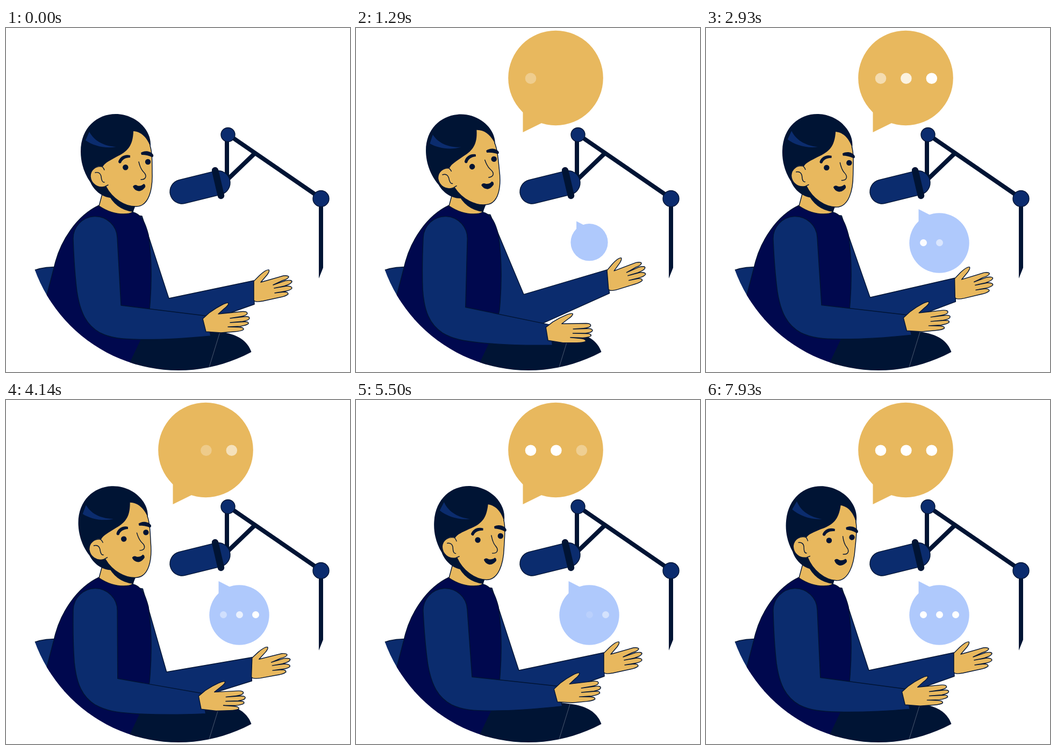
These frames come from a looping animation (640x640 px, 8000 ms). An HTML page:

```html
<!DOCTYPE html>
<html lang="en">
<head>
<meta charset="utf-8">
<title>Podcast talk</title>
<style>
  html, body { margin: 0; height: 100%; overflow: hidden; background: #fff; }
  svg { display: block; width: 100vw; height: 100vh; }
  .dark { fill: #001434; }
  .blue { fill: #0b2c6e; }
  .navy { fill: #00084e; }
  .skin { fill: #e8b85e; }
  .pale { fill: #afc9fc; }
  .edge { stroke: #001434; stroke-width: 1.4; stroke-linejoin: round; }
  .line { fill: none; stroke: #001434; stroke-width: 1.4; stroke-linecap: round; }
  .bar { fill: none; stroke: #001434; stroke-width: 8; }
</style>
</head>
<body>
<svg viewBox="0 0 640 640">
  <defs>
    <clipPath id="disc"><circle cx="321" cy="352.4" r="284.6"/></clipPath>
  </defs>

  <g clip-path="url(#disc)">
    <path class="blue edge" d="M40 456Q66 443 95 445L80 510L60 510Z"/>
  </g>

  <g id="farArm">
    <path class="blue edge" d="M215 345L253 350L303 503L461 470L462 514L335 559L255 560Z"/>
    <path class="skin edge" d="M461 471L472 460Q484 449 489 450Q491 452 486 459L474 473L516 461Q525 460 526 463Q525 467 514 470L497 478L520 470Q532 468 532 472Q531 476 518 480L499 484L522 480Q532 480 532 484Q530 488 518 490L500 493L517 491Q525 491 525 495Q521 499 510 501L478 508Q462 511 461 506Z"/>
  </g>

  <g clip-path="url(#disc)">
    <path class="navy edge" d="M173 330C130 350 102 398 92 435L70 520L100 640H240L267 525C272 470 271 425 265 385C260 365 253 347 237 343Z"/>
    <path class="dark" d="M249 583L260 562L380 563L399 565.5C430 569 450 582 457 604V640H222Z"/>
    <path d="M398 566L377 634" stroke="#6b7488" stroke-width=".7"/>
  </g>

  <path class="skin edge" d="M180 305L173 331Q195 346 219 346Q231 346 236 342L242 320Z"/>
  <path class="dark" d="M188 305Q203 338 236 342L242 328L220 305Z"/>

  <g id="head">
    <path class="dark" d="M196 316C178 315 163 301 157 287C145 270 139 250 139 230C139 185 170 160 204 160C240 160 269 188 269 216V228L190 270Z"/>
    <path class="skin" d="M237 192C252 193 262 204 268 219C272 230 272 250 272 270C273 300 266 331 243 332C222 333 198 318 186 295C170 299 158 289 157 276C157 263 170 254 180 258C184 251 191 248 205 240C226 230 236 220 237 192Z"/>
    <path class="line" d="M268 219C272 230 272 250 272 270C273 300 266 331 243 332C222 333 198 318 186 295M190 292L184 295C170 299 158 289 157 276C157 263 168 256 179 258Q182 261 183 264M166 269Q175 267 177 276Q178 288 183 287M247 249Q250 262 256 268Q262 274 259 279Q257 282 251 282"/>
    <path class="blue" d="M148 209L155 193C165 212 185 220 205 221C185 225 162 219 148 209Z"/>
    <path class="dark" d="M209 249C211 240 221 234 231 237V241C222 241 216 245 214 251Q210 253 209 249ZM251 232C259 227 270 229 274 236Q275 241 271 240C265 237 258 236 252 236Z"/>
    <circle class="dark" cx="222.3" cy="259.3" r="5.2"/>
    <circle class="dark" cx="264" cy="249" r="5.2"/>
    <path class="dark" d="M236 295Q239 290 245 293.500Q252 294.500 256 290Q260 291 259 296Q254 303 247 303.500Q239 302.500 236 295Z"/>
  </g>

  <g id="nearArm">
    <path class="blue edge" d="M125 393A41 41 0 0 1 207 390L214 516L372 535.500L381 573C330 578 290 580 249 579.500C215 579 195 577 175 567C150 553 138 530 132 490C127 450 126 420 125 393Z"/>
    <path class="skin edge" d="M366 541L378 530Q390 521 402 515Q412 510 414 512Q414 516 406 522L395 532L440 527.500Q449 527 449 531Q448 535 436 537L417 540L444 537Q453 536 453 540Q452 544 440 546L417 548L443 546.500Q452 546 451 550Q448 553 436 555L413 556L434 556.500Q443 557 442 561Q438 564 425 565L400 567L372 565Z"/>
  </g>

  <g id="microphone">
    <path class="bar" d="M413 198L586 317M411 200V280M462 234L412 282"/>
    <path class="dark" d="M582 320H590V446L582 466Z"/>
    <g fill="none" stroke-linecap="round">
      <path d="M327.500 304.500L394.500 288" stroke="#001434" stroke-width="46.400"/>
      <path d="M327.500 304.500L394.500 288" stroke="#0b2c6e" stroke-width="43.600"/>
      <path d="M389 265L400 312" stroke="#001434" stroke-width="12.500"/>
    </g>
    <circle class="blue edge" cx="413" cy="198.500" r="13"/>
    <circle class="blue edge" cx="586" cy="317.500" r="15"/>
  </g>

  <g id="bigBubble" class="skin">
    <circle cx="371.500" cy="93" r="88.300"/>
    <path d="M310.500 150V194L345 177Z"/>
  </g>
  <g id="smallBubble" class="pale">
    <circle cx="434" cy="400" r="55.700"/>
    <path d="M395.500 365V337L419 349Z"/>
  </g>
  <g id="dots" fill="#fff"></g>
</svg>

<script>
const LOOP = 8000;
const byId = id => document.getElementById(id);
const clamp = v => Math.min(1, Math.max(0, v));
const ramp = (t, start, length) => clamp((t - start) / length);
const ease = p => (1 - Math.cos(Math.PI * p)) / 2;

// Eased swing through [time, degrees] extremes.
function swing(keys, t) {
  const i = keys.findIndex(key => key[0] > t);
  const [t0, a0] = keys[i - 1], [t1, a1] = keys[i];
  return a0 + (a1 - a0) * ease((t - t0) / (t1 - t0));
}

const joints = [
  { id: "head", pivot: "206 324", keys: [[0, 0], [1200, -5.5], [2600, 2.7], [3900, -3.1], [5500, 3.8], [6850, -0.5], [8100, 6.3]] },
  { id: "nearArm", pivot: "166 393", keys: [[0, 0], [1280, 4.7], [2250, -0.9], [2650, -0.9], [4000, 3.1], [4950, -0.9], [5750, -0.9], [7350, 3], [8350, -0.9]] },
  { id: "farArm", pivot: "218 388", keys: [[0, 0], [1050, -5.4], [2200, 1.4], [3450, -2.6], [4300, 2.5], [5100, 0], [9000, 0]] }
];

const bubbles = [
  { id: "bigBubble", x: 371.5, y: 99, start: 0 },
  { id: "smallBubble", x: 434, y: 396.5, start: 690 }
];

// Each row of dots appears, fades and reappears one dot after another.
const rows = [
  { x: 325, y: 93.8, gap: 47.4, r: 10.3, appear: [1080, 580], fade: [1830, 680], again: [4150, 570] },
  { x: 404.5, y: 399.5, gap: 30, r: 6.5, appear: [1900, 650], fade: [2820, 740], again: [5900, 695] }
];
const dots = rows.flatMap(row => [0, 1, 2].map(i => {
  const node = document.createElementNS("http://www.w3.org/2000/svg", "circle");
  node.setAttribute("cx", row.x + i * row.gap);
  node.setAttribute("cy", row.y);
  node.setAttribute("r", row.r);
  byId("dots").append(node);
  const at = ([first, step]) => first + i * step;
  return { node, appear: at(row.appear), fade: at(row.fade), again: at(row.again) };
}));

function draw(t) {
  for (const { id, pivot, keys } of joints)
    byId(id).setAttribute("transform", `rotate(${swing(keys, t)} ${pivot})`);

  for (const { id, x, y, start } of bubbles) {
    const scale = ease(ramp(t, start, 1040));
    byId(id).setAttribute("transform", `translate(${x} ${y}) scale(${scale}) translate(${-x} ${-y})`);
  }

  for (const { node, appear, fade, again } of dots) {
    const first = Math.min(ramp(t, appear, 700), 1 - ramp(t, fade, 2250));
    node.setAttribute("opacity", Math.max(first, ramp(t, again, 650)));
  }
}

function tick() {
  draw(performance.now() % LOOP);
  requestAnimationFrame(tick);
}
tick();
</script>
</body>
</html>
```
